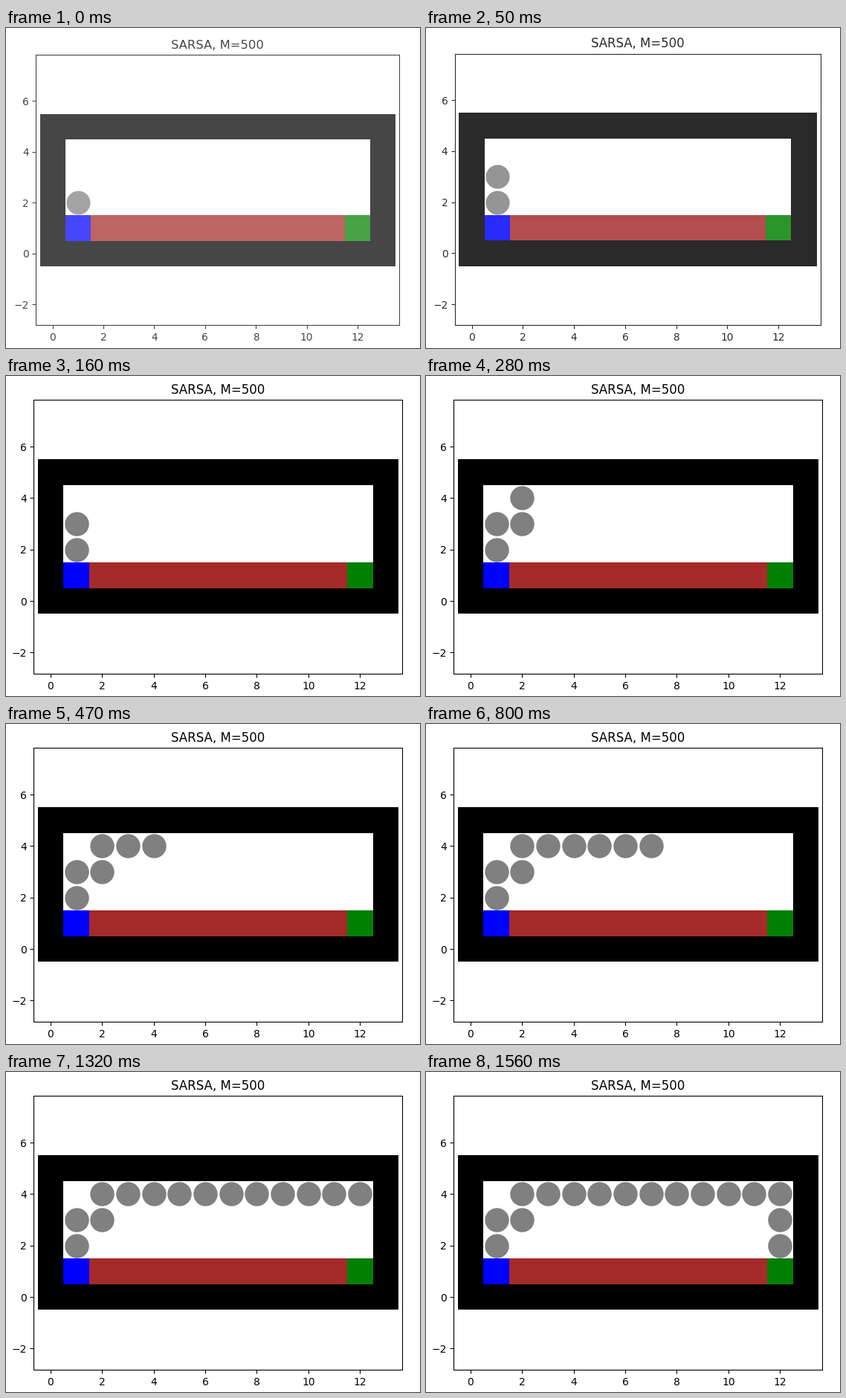
Animation, 557 px wide and 431 px high, one loop 2130 ms. Source, as a matplotlib script:

```python
import matplotlib.pyplot as plt
from matplotlib.animation import FuncAnimation
from matplotlib.patches import Rectangle

W, H, DPI = 557, 431, 100
LOOP_MS, STEP_MS = 2130, 10
LEFT, RIGHT, TOP, BOTTOM = 37.4, 533.4, 32.0, 400.8
ZOOM_X, ZOOM_Y = 250, 345

plt.rcParams["font.family"] = "DejaVu Sans"
# The small margin keeps rounding from dropping a pixel row.
fig = plt.figure(figsize=((W + 0.01) / DPI, (H + 0.01) / DPI), dpi=DPI, facecolor="white")
ax = fig.add_axes([0, 0, 1, 1])
ax.set_xlim(-0.65, 13.65)
half_height = (BOTTOM - TOP) / (RIGHT - LEFT) * 14.3 / 2
ax.set_ylim(2.5 - half_height, 2.5 + half_height)
ax.set_xticks(range(0, 13, 2))
ax.set_yticks(range(-2, 7, 2))
title = ax.set_title("SARSA, M=500", fontsize=12)


def block(x, y, w, h, color):
    ax.add_patch(Rectangle((x - 0.5, y - 0.5), w, h, color=color, lw=0))


block(0, 0, 14, 1, "black")
block(0, 5, 14, 1, "black")
block(0, 0, 1, 6, "black")
block(13, 0, 1, 6, "black")
block(2, 1, 10, 1, "brown")
block(1, 1, 1, 1, "blue")
block(12, 1, 1, 1, "green")

# The agent's route and the moment each step appears.
route = [(1, 2), (1, 3), (2, 3)] + [(x, 4) for x in range(2, 13)] + [(12, 3), (12, 2)]
times = [0, 50, 190, 280, 420, 470, 660, 730, 800, 940, 990,
         1170, 1250, 1320, 1460, 1560]
dots = [ax.scatter(x, y, s=500, color="gray", zorder=3) for x, y in route]

veil = Rectangle((0, 0), 1, 1, transform=fig.transFigure, color="white", lw=0, zorder=10)
fig.add_artist(veil)


def opacity(t):
    if t < 50:
        return 0.72
    if t < 100:
        return 0.83
    return 0.91 if t < 160 else 1.0


def zoom(scale):
    """Scale the whole plot around the zoom centre."""
    x0, x1 = (ZOOM_X + (x - ZOOM_X) * scale for x in (LEFT, RIGHT))
    y0, y1 = (ZOOM_Y + (y - ZOOM_Y) * scale for y in (TOP, BOTTOM))
    ax.set_position([x0 / W, 1 - y1 / H, (x1 - x0) / W, (y1 - y0) / H])
    title.set_fontsize(12 * scale)
    for label in ax.get_xticklabels() + ax.get_yticklabels():
        label.set_fontsize(10 * scale)
    for dot in dots:
        dot.set_sizes([500 * scale ** 2])


def update(frame):
    t = frame * STEP_MS
    alpha = opacity(t)
    zoom(0.95 + 0.05 * alpha)
    veil.set_alpha(1 - alpha)
    for dot, start in zip(dots, times):
        dot.set_visible(t >= start)
    return dots


anim = FuncAnimation(fig, update, frames=LOOP_MS // STEP_MS, interval=STEP_MS,
                     repeat=True, repeat_delay=0, blit=False)
plt.show()
```
